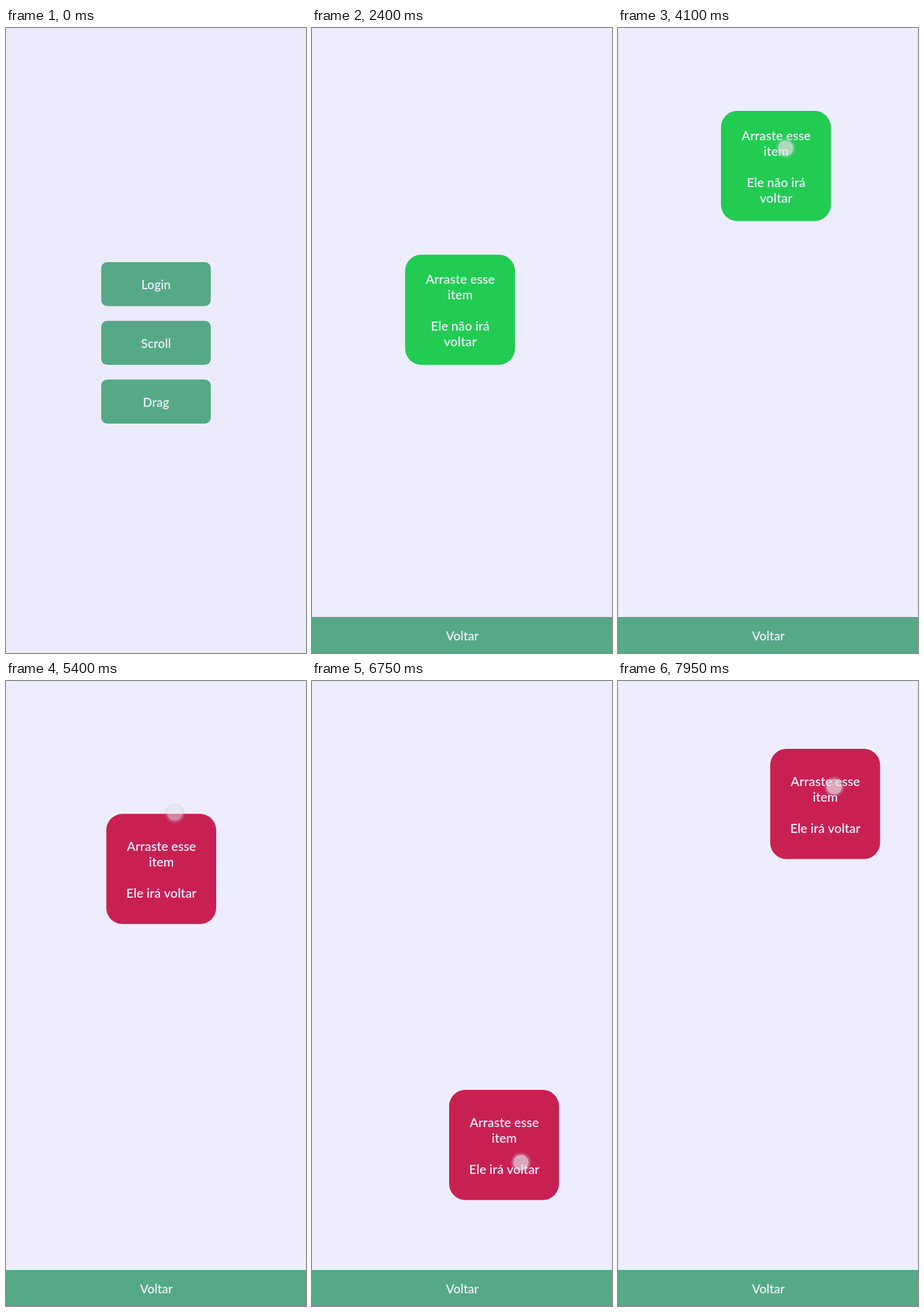
An HTML page with a canvas for the animation above (8 s loop, 501 by 1041 pixels).

```html
<!DOCTYPE html>
<html lang="pt">
<head>
<meta charset="utf-8">
<title>Drag</title>
<style>
  html, body { margin: 0; width: 100%; height: 100%; overflow: hidden; background: #edecfc; }
  canvas { display: block; }
</style>
</head>
<body>
<canvas id="stage" width="501" height="1041"></canvas>
<script>
const ctx = document.getElementById('stage').getContext('2d');
const W = 501, H = 1041, LOOP = 8000, STEP = 50;
const CARD = 183.5, REST = { x: 159, y: 371 };
const TEAL = '#56a986', INK = '#eeedfb';

const clamp = v => Math.max(0, Math.min(1, v));
const ramp = (t, a, b) => clamp((t - a) / (b - a));

// Keys are [time, x, y]
const DRAGS = {
  down: [[2370, 159, 371], [2400, 155.5, 377.5], [2600, 92, 465], [2850, 43, 570], [3050, 36, 592]],
  up: [[3380, 36, 592], [3550, 41, 582.5], [3750, 98, 415], [3950, 160, 198], [4100, 172, 138], [4200, 172, 142]],
  right: [[6250, 159, 371], [6400, 188, 475], [6620, 234, 657], [6750, 229, 681], [6810, 229, 681]],
  corner: [[7580, 159, 379], [7700, 188, 300], [7850, 244, 153], [7950, 254.2, 113], [8000, 255, 112]]
};

// Smooth curve through the keys that does not overshoot them
function along(keys, t, axis) {
  const last = keys.length - 1;
  if (t <= keys[0][0]) return keys[0][axis];
  if (t >= keys[last][0]) return keys[last][axis];
  const i = keys.findIndex(k => k[0] > t) - 1;
  const slope = j => (keys[j + 1][axis] - keys[j][axis]) / (keys[j + 1][0] - keys[j][0]);
  const tangent = j => {
    if (j === 0 || j === last) return 0;
    const a = slope(j - 1), b = slope(j);
    return a * b <= 0 ? 0 : 2 * a * b / (a + b);
  };
  const span = keys[i + 1][0] - keys[i][0], u = (t - keys[i][0]) / span;
  const u2 = u * u, u3 = u2 * u;
  return (2 * u3 - 3 * u2 + 1) * keys[i][axis] + (3 * u2 - 2 * u3) * keys[i + 1][axis] +
    span * ((u3 - 2 * u2 + u) * tangent(i) + (u3 - u2) * tangent(i + 1));
}

const drag = (keys, t) => ({ x: along(keys, t, 1), y: along(keys, t, 2) });

// Underdamped return to the resting place
function spring(x, y, ms) {
  const w = 10.5, z = 0.49, s = Math.max(0, ms) / 1000;
  const wd = w * Math.sqrt(1 - z * z);
  const left = Math.exp(-z * w * s) * (Math.cos(wd * s) + z * w / wd * Math.sin(wd * s));
  return { x: REST.x + (x - REST.x) * left, y: REST.y + (y - REST.y) * left };
}

function cardAt(t) {
  if (t < 3380) return drag(DRAGS.down, t);
  if (t < 5304) return drag(DRAGS.up, t);
  if (t < 6250) return spring(172, 142, t - 5304);
  if (t < 6810) return drag(DRAGS.right, t);
  if (t < 7580) return spring(229, 681, t - 6810);
  return drag(DRAGS.corner, t);
}

function box(x, y, w, h, r, color) {
  ctx.fillStyle = color;
  ctx.beginPath();
  ctx.roundRect(x, y, w, h, r);
  ctx.fill();
}

function label(text, x, y, size) {
  ctx.font = `600 ${size}px Lato, "Open Sans", sans-serif`;
  ctx.textAlign = 'center';
  ctx.fillStyle = INK;
  ctx.fillText(text, x, y);
}

function disc(x, y, r, color) {
  ctx.fillStyle = color;
  ctx.beginPath();
  ctx.arc(x, y, r, 0, Math.PI * 2);
  ctx.fill();
}

function touch(x, y, alpha) {
  if (alpha <= 0) return;
  ctx.save();
  ctx.globalAlpha = alpha;
  disc(x, y, 17, 'rgba(190,190,200,0.2)');
  disc(x, y, 15, 'rgba(190,190,200,0.22)');
  disc(x, y, 12.8, 'rgba(245,240,250,0.5)');
  ctx.restore();
}

function menu(t) {
  ctx.fillStyle = '#ecebfb';
  ctx.fillRect(0, 0, W, H);
  ['Login', 'Scroll', 'Drag'].forEach((name, i) => {
    const y = 390 + i * 97.8;
    box(159, y, 183, 73.3, 10, TEAL);
    label(name, 250.5, y + 45, 20.5);
  });
  touch(262, 622, t >= 1150 ? 1 : 0);
}

function card({ x, y }, red) {
  box(x, y, CARD, CARD, 27, red ? '#c92052' : '#22cc52');
  const lines = red
    ? [['Arraste esse', 54], ['item', 80], ['Ele irá voltar', 132]]
    : [['Arraste esse', 41], ['item', 67], ['Ele não irá', 119], ['voltar', 145]];
  for (const [text, dy] of lines) label(text, x + 92, y + dy + 7.5, 21.3);
}

function dragScreen(t) {
  ctx.fillStyle = '#eeedfd';
  ctx.fillRect(0, 0, W, H);
  ctx.fillStyle = TEAL;
  ctx.fillRect(0, 981, W, 60);
  label('Voltar', 251, 1019.5, 20.5);

  const at = cardAt(t);
  card(at, t >= 5304);

  const held = (from, to, dx, dy) => {
    if (t >= from && t < to) touch(at.x + dx, at.y + dy, 1);
  };
  held(2420, 3060, 108, 62);
  held(3400, 4210, 108, 62);
  if (t >= 4950 && t < 5450) touch(282, 220, 1 - 0.3 * ramp(t, 5300, 5400));
  held(6250, 6810, 120, 121);
  held(7580, LOOP, 107, 63);
}

function draw(t) {
  const shown = ramp(t, 1180, 1350);
  if (shown < 1) menu(t);
  if (shown > 0) {
    ctx.globalAlpha = shown;
    dragScreen(t);
    ctx.globalAlpha = 1;
  }
}

const start = performance.now();
function tick() {
  const t = (performance.now() - start) % LOOP;
  draw(Math.floor(t / STEP) * STEP);
  requestAnimationFrame(tick);
}
tick();
</script>
</body>
</html>
```
